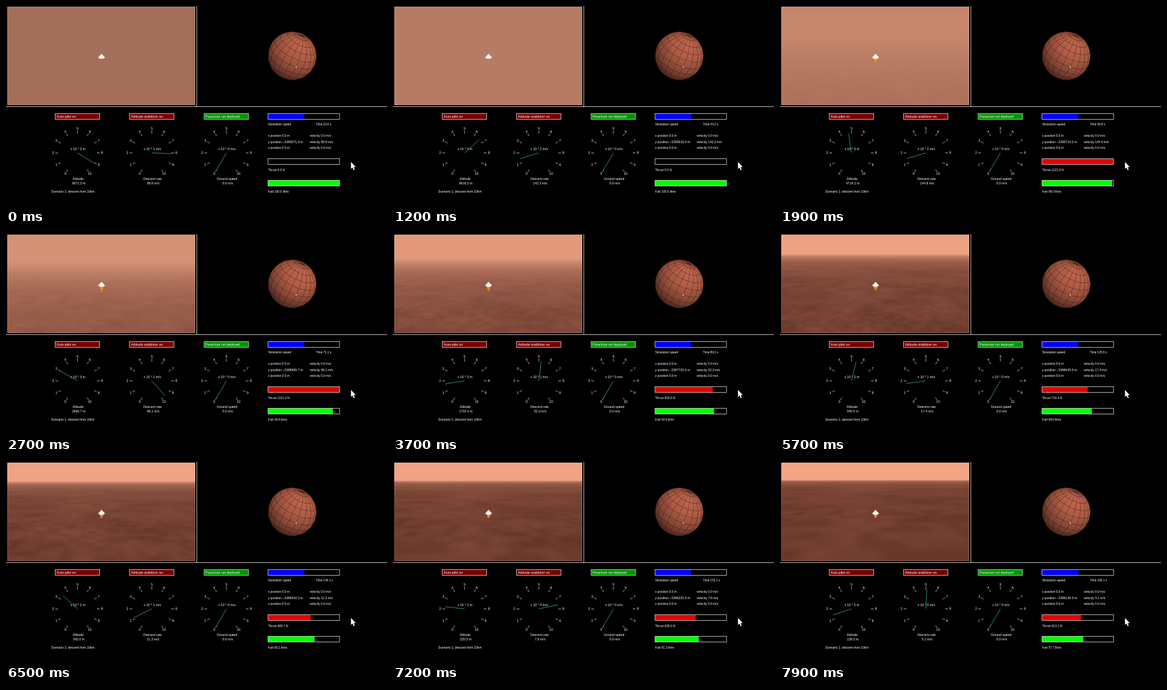
Animation, 600 px wide and 315 px high, one loop 8 s. Source, as an HTML page with a canvas:

```html
<!DOCTYPE html>
<html lang="en">
<head>
<meta charset="utf-8">
<title>Lander descent</title>
<style>
  html, body { margin: 0; width: 100%; height: 100%; overflow: hidden; background: #000; }
  #stage { position: relative; width: 600px; height: 315px; overflow: hidden; }
  canvas { position: absolute; left: 2px; top: 1px; }
  svg { position: absolute; left: 0; top: 0; }
  text { font-family: "Liberation Sans", Arial, sans-serif; font-size: 5.1px; fill: #fff; white-space: pre; }
  .mid { text-anchor: middle; }
  .box { fill: none; stroke: #d4d4d4; stroke-width: .8; }
  .tick { stroke: #ccc; stroke-width: .8; }
  .needle { stroke: #38b07c; stroke-width: .8; }
  .grid { fill: none; stroke: #2e150e; stroke-width: .6; opacity: .75; }
</style>
</head>
<body>
<div id="stage">
  <canvas id="view" width="296" height="155"></canvas>
  <svg width="600" height="315" viewBox="0 0 600 315">
    <defs>
      <radialGradient id="mars" cx=".72" cy=".26" r=".86">
        <stop offset="0" stop-color="#c2684f"/>
        <stop offset=".4" stop-color="#ad5b45"/>
        <stop offset=".7" stop-color="#864736"/>
        <stop offset=".95" stop-color="#4f2a20"/>
      </radialGradient>
      <linearGradient id="fire" x1="0" y1="0" x2="0" y2="1">
        <stop offset="0" stop-color="#f09a28"/>
        <stop offset="1" stop-color="#d8701c"/>
      </linearGradient>
    </defs>
    <rect x="2.5" y="1.5" width="295" height="154" fill="none" stroke="#fff" stroke-opacity=".13"/>
    <path d="M0 158.5H600M300.5 0V158.5" stroke="#b4b4b4" fill="none"/>
    <path id="flame" fill="url(#fire)"/>
    <path d="M150.5 75.3L156 81.3Q150.5 85 145 81.3Z" fill="#fff"/>
    <g id="globe"></g>
    <g id="panel"></g>
    <path d="M543.3 245.6v11l2.4-2.2 1.9 4.2 1.7-.8-1.9-4h3.3z" fill="#fff"/>
  </svg>
</div>
<script>
const $ = id => document.getElementById(id);
const LOOP = 8000, STEP = 100;
const MAX_THRUST = 1121, BURN = 52.7, THROTTLE = 75.6, RADIUS = 3386000;

// ms, flight time, altitude, descent rate, thrust, thrust slope, fuel
const KEYS = [
  [0, 22.6, 9071.3, 80.8, 0, 0, 100],
  [1200, 44.2, 6616, 142.3, 0, 0, 100],
  [1674, 52.7, 5331, 159.5, 1121, 0, 100],
  [2700, 71.1, 2990.7, 96.1, 1121, 0, 90.8],
  [2950, 75.6, 2594, 79.4, 1040, -13, 88.5],
  [3700, 89.2, 1702, 52.3, 905.6, -7.5, 82.6],
  [5000, 113, 814.1, 25.5, 768.1, -4.5, 73.8],
  [6500, 140.1, 342, 11.3, 669.7, -2.8, 65.1],
  [7900, 166.1, 139.3, 5.1, 613.1, -1.8, 57.7]
];

const clamp = (v, lo, hi) => Math.max(lo, Math.min(hi, v));

// Cubic through a and b with end slopes; returns value and slope
function hermite(a, b, ma, mb, span, u) {
  const d = b - a, p = ma * span, q = mb * span;
  const c2 = 3 * d - 2 * p - q, c3 = p + q - 2 * d;
  return [a + u * (p + u * (c2 + u * c3)), (p + u * (2 * c2 + u * 3 * c3)) / span];
}

function flight(ms) {
  let i = 0;
  while (i < KEYS.length - 2 && ms >= KEYS[i + 1][0]) i++;
  const a = KEYS[i], b = KEYS[i + 1];
  const u = (ms - a[0]) / (b[0] - a[0]), span = b[1] - a[1];
  const time = a[1] + span * u;
  const [alt, climb] = hermite(a[2], b[2], -a[3], -b[3], span, u);
  const burn = -.5 / MAX_THRUST;
  const fuel = Math.min(100, hermite(a[6], b[6], a[4] * burn, b[4] * burn, span, u)[0]);
  const thrust = time < BURN - .01 ? 0 : time < THROTTLE ? MAX_THRUST
    : hermite(a[4], b[4], a[5], b[5], span, u)[0];
  return { time, alt, rate: -climb, thrust, fuel };
}

/* Instruments */
const NS = "http://www.w3.org/2000/svg";
const panel = $("panel");

function add(parent, tag, attrs, str) {
  const el = document.createElementNS(NS, tag);
  for (const k in attrs) el.setAttribute(k, attrs[k]);
  if (str !== undefined) el.textContent = str;
  parent.appendChild(el);
  return el;
}
const label = (x, y, str = "", size = 5.1) =>
  add(panel, "text", { x, y, style: `font-size:${size}px` }, str);
const centred = (x, y, str = "") => add(panel, "text", { x, y, class: "mid" }, str);

function bar(x, y, w, color, fill = 1) {
  const inner = add(panel, "rect", { x, y, width: w * fill, height: 9, fill: color });
  add(panel, "rect", { x, y, width: w, height: 9, class: "box" });
  return f => inner.setAttribute("width", w * f);
}

function polar(cx, cy, r, value) {
  const a = (30 + value * 30) * Math.PI / 180;
  return [cx - r * Math.sin(a), cy + r * Math.cos(a)];
}

function gauge(cx, name, unit) {
  const cy = 231.3;
  for (let i = 0; i <= 10; i++) {
    const [x1, y1] = polar(cx, cy, 30.5, i), [x2, y2] = polar(cx, cy, 35, i);
    add(panel, "line", { x1, y1, x2, y2, class: "tick" });
    const [x, y] = polar(cx, cy, 38.5, i);
    centred(x, y + 1.8, i);
  }
  const scale = centred(cx + .7, 227);
  const needle = add(panel, "line", { x1: cx, y1: cy, class: "needle" });
  centred(cx + 1, 274, name);
  const readout = centred(cx + 2, 280.6);
  return v => {
    const power = v < 1 ? 0 : Math.floor(Math.log10(v));
    const [x, y] = polar(cx, cy, 30.8, v / 10 ** power);
    needle.setAttribute("x2", x);
    needle.setAttribute("y2", y);
    scale.textContent = `x 10 ^ ${power} ${unit}`;
    readout.textContent = `${v.toFixed(1)} ${unit}`;
  };
}

[[77.5, "Auto-pilot on", "#7a0000", 5.4],
 [194.5, "Attitude stabilizer on", "#7a0000", 5.6],
 [312, "Parachute not deployed", "#009600", 5.1]].forEach(([x, str, color, size]) => {
  bar(x, 169.5, 70, color);
  label(x + 2.3, 176, str, size);
});

const showAlt = gauge(112.6, "Altitude", "m");
const showRate = gauge(229.7, "Descent rate", "m/s");
const showGround = gauge(347.1, "Ground speed", "m/s");
label(71.3, 294, "Scenario 1: descent from 10km", 4.95);

const COL = 412.7, COL2 = 478.3;
bar(COL, 169.5, 112.5, "#0000ff", .505);
label(COL, 188, "Simulation speed", 4.75);
const clock = label(488, 188, "", 4.7);
label(COL, 206.3, "x position 0.0 m", 4.9);
label(COL2, 206.3, "velocity 0.0 m/s", 4.9);
const yPos = label(COL, 215.6, "", 5.05);
const yVel = label(COL2, 215.6, "", 4.95);
label(COL, 225, "z position 0.0 m", 4.9);
label(COL2, 225, "velocity 0.0 m/s", 4.9);
const thrustBar = bar(COL, 240.5, 112.5, "#e80000");
const thrustText = label(COL, 260, "", 4.8);
const fuelBar = bar(COL, 274.5, 112.5, "#00ff00");
const fuelText = label(COL, 294, "", 4.6);

/* Planet: orthographic sphere with an 18 degree graticule */
function drawGlobe() {
  const g = $("globe"), cx = 450.8, cy = 78.5, r = 37.9;
  const unit = v => { const n = Math.hypot(...v); return v.map(c => c / n); };
  const cross = (a, b) => [a[1] * b[2] - a[2] * b[1], a[2] * b[0] - a[0] * b[2], a[0] * b[1] - a[1] * b[0]];
  const pole = unit([.41, -.83, .375]);
  const east = unit(cross(pole, [.16, .46, .87])), front = cross(east, pole);
  let d = "";
  function curve(point) {
    let pen = false;
    for (let i = 0; i <= 72; i++) {
      const [lat, lon] = point(i / 72);
      const p = [0, 1, 2].map(k => pole[k] * Math.sin(lat) +
        Math.cos(lat) * (front[k] * Math.cos(lon) + east[k] * Math.sin(lon)));
      if (p[2] > 0) d += (pen ? "L" : "M") + (cx + r * p[0]).toFixed(2) + " " + (cy + r * p[1]).toFixed(2);
      pen = p[2] > 0;
    }
  }
  const cell = Math.PI / 10;
  for (let i = 0; i < 20; i++) curve(u => [(u - .5) * Math.PI, i * cell]);
  for (let i = -4; i <= 4; i++) curve(u => [i * cell, u * 2 * Math.PI]);
  add(g, "circle", { cx, cy, r, fill: "url(#mars)" });
  add(g, "path", { d, class: "grid" });
  add(g, "rect", { x: 456, y: 95.2, width: 2, height: 1.6, fill: "#e8efe8" });
}

/* Ground seen through haze */
const view = $("view").getContext("2d");
const W = 296, H = 155, FOCAL = 250;
const image = view.createImageData(W, H);
const SKY = [243, 165, 134], SOIL = [112, 61, 47];

function hash(x, z) {
  let n = Math.imul(x, 374761393) ^ Math.imul(z, 668265263);
  n = Math.imul(n ^ (n >>> 13), 1274126177);
  return ((n ^ (n >>> 16)) & 65535) / 32768 - 1;
}

function noise(x, z) {
  const ix = Math.floor(x), iz = Math.floor(z);
  let u = x - ix, v = z - iz;
  u *= u * (3 - 2 * u);
  v *= v * (3 - 2 * v);
  const a = hash(ix, iz), b = hash(ix + 1, iz), c = hash(ix, iz + 1), e = hash(ix + 1, iz + 1);
  return a + (b - a) * u + (c - a + (a - b - c + e) * u) * v;
}

function drawGround(alt) {
  const glow = Math.exp(-alt / 22800), sky = SKY.map(c => c * glow);
  const horizon = 24.5 + Math.sqrt(2 * alt / RADIUS) * FOCAL;
  const shown = clamp((6500 - alt) / 4000, 0, 1);
  for (let y = 0, k = 0; y < H; y++) {
    const dy = y + .5 - horizon;
    const clear = dy > 0 ? shown * Math.exp(-.011 * alt / dy) : 0;
    const base = sky.map((c, i) => c + (SOIL[i] - c) * clear);
    const depth = FOCAL * alt / dy, perRow = depth / dy;
    // Leave out detail finer than a couple of rows
    const layers = clear < .02 ? [] : [50, 200, 800]
      .map(size => [size, 8 * clear * clamp(size / perRow / 3 - .2, 0, 1)])
      .filter(l => l[1] > 0);
    for (let x = 0; x < W; x++, k += 4) {
      const across = (x - 148.5) * alt / dy;
      let n = 0;
      for (const [size, gain] of layers) n += gain * noise(across / size + 7.3, depth / size + 3.1);
      image.data[k] = base[0] + n;
      image.data[k + 1] = base[1] + n * .75;
      image.data[k + 2] = base[2] + n * .65;
      image.data[k + 3] = 255;
    }
  }
  view.putImageData(image, 0, 0);
}

function draw(ms) {
  const s = flight(ms);
  drawGround(s.alt);
  const power = s.thrust / MAX_THRUST;
  $("flame").setAttribute("d", power ? `M147.3 82.5H153.7L151.3 ${84.5 + 7 * power}H149.7Z` : "");
  showAlt(s.alt);
  showRate(s.rate);
  showGround(0);
  clock.textContent = `Time ${s.time.toFixed(1)} s`;
  yPos.textContent = `y position \u2212${(RADIUS + s.alt).toFixed(1)} m`;
  yVel.textContent = `velocity ${s.rate.toFixed(1)} m/s`;
  thrustBar(power);
  thrustText.textContent = `Thrust ${s.thrust.toFixed(1)} N`;
  fuelBar(s.fuel / 100);
  fuelText.textContent = `Fuel ${s.fuel.toFixed(1)} litres`;
}

drawGlobe();
const start = performance.now();
let last = -1;
function tick() {
  const ms = (performance.now() - start) % LOOP;
  const step = Math.floor(ms / STEP);
  if (step !== last) draw((last = step) * STEP);
  requestAnimationFrame(tick);
}
tick();
</script>
</body>
</html>
```
